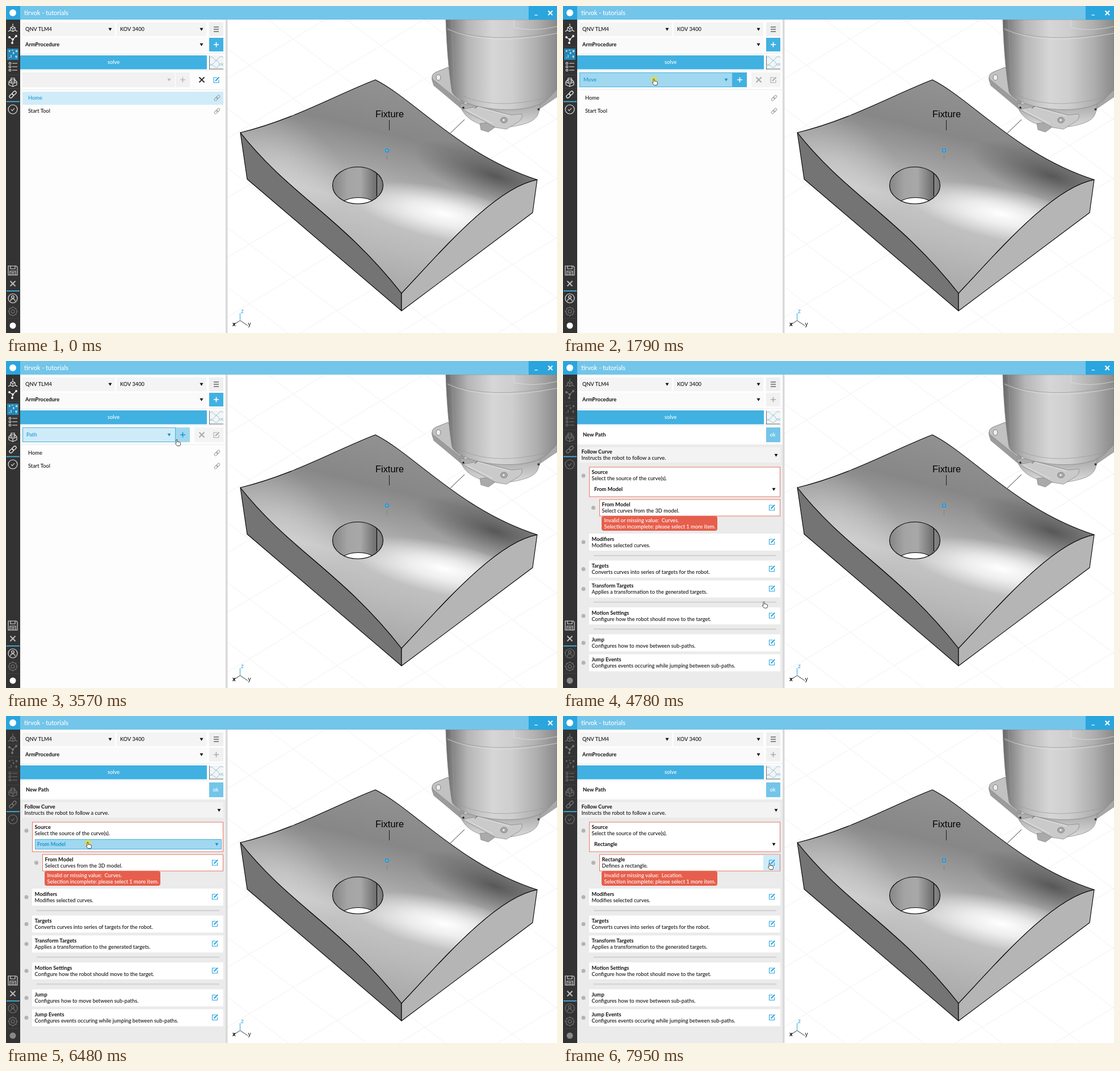
These frames come from a looping animation (971 by 576 pixels, 8 s). An HTML page:

```html
<!DOCTYPE html>
<html lang="en">
<head>
<meta charset="utf-8">
<title>Path tutorial</title>
<style>
  html, body { margin: 0; width: 100%; height: 100%; overflow: hidden; background: #fff; }
  svg { display: block; width: 100vw; height: 100vh; font: 500 9.3px Lato, "Open Sans", sans-serif; }
  .label { font-family: "Liberation Sans", Arial, sans-serif; }
</style>
</head>
<body>
<svg viewBox="0 0 971 576" preserveAspectRatio="none">
  <defs>
    <linearGradient id="top" gradientUnits="userSpaceOnUse" x1="690" y1="135" x2="600" y2="490">
      <stop offset="0" stop-color="#929292"/><stop offset=".25" stop-color="#878787"/>
      <stop offset=".42" stop-color="#a2a2a2"/><stop offset=".6" stop-color="#c6c6c6"/>
      <stop offset=".78" stop-color="#b9b9b9"/><stop offset="1" stop-color="#a6a6a6"/>
    </linearGradient>
    <radialGradient id="shine"><stop offset="0" stop-color="#fff"/><stop offset=".4" stop-color="#fff" stop-opacity=".7"/><stop offset="1" stop-color="#fff" stop-opacity="0"/></radialGradient>
    <radialGradient id="shade"><stop offset="0" stop-color="#444" stop-opacity=".75"/><stop offset="1" stop-color="#555" stop-opacity="0"/></radialGradient>
    <linearGradient id="bore">
      <stop offset="0" stop-color="#858585"/><stop offset=".3" stop-color="#a4a4a4"/><stop offset=".55" stop-color="#a8a8a8"/>
      <stop offset=".87" stop-color="#6c6c6c"/><stop offset=".88" stop-color="#858585"/><stop offset="1" stop-color="#777"/>
    </linearGradient>
    <linearGradient id="arm">
      <stop offset="0" stop-color="#666"/><stop offset=".07" stop-color="#888"/><stop offset=".2" stop-color="#b6b6b6"/>
      <stop offset=".42" stop-color="#d6d6d6"/><stop offset=".6" stop-color="#cecece"/><stop offset=".82" stop-color="#aeaeae"/><stop offset="1" stop-color="#8a8a8a"/>
    </linearGradient>
    <linearGradient id="cup" x2="0" y2="1"><stop offset="0" stop-color="#a8a8a8"/><stop offset="1" stop-color="#dcdcdc"/></linearGradient>
    <path id="surface" d="M413 223C505 201 585 155 651 130C720 165 800 262 936 306C860 320 760 440 697 506C592 372 500 333 413 223Z"/>
    <clipPath id="onSurface"><use href="#surface"/></clipPath>
    <clipPath id="view"><rect x="390" y="24" width="581" height="552"/></clipPath>
    <clipPath id="inBore"><ellipse cx="620" cy="316" rx="44.5" ry="32.5"/></clipPath>
    <filter id="shadow" x="-5%" y="-5%" width="110%" height="115%"><feDropShadow dx="1" dy="1" stdDeviation="1.5" flood-opacity=".35"/></filter>
  </defs>

  <g clip-path="url(#view)">
    <path id="grid" fill="none" stroke="#f1f1f1"/>
    <g stroke="#000" stroke-width="1.1" stroke-linejoin="round">
      <path fill="#747474" d="M413 223C500 333 592 372 697 506V537L425 305Z"/>
      <path fill="#b5b5b5" d="M697 506C760 440 860 320 936 306L928 364L697 537Z"/>
      <use href="#surface" fill="url(#top)" stroke="none"/>
      <g clip-path="url(#onSurface)" stroke="none">
        <ellipse rx="165" ry="46" fill="url(#shine)" transform="translate(772 366) rotate(12)"/>
        <ellipse rx="150" ry="46" fill="url(#shade)" transform="translate(862 300) rotate(18)"/>
        <ellipse rx="130" ry="75" fill="url(#shine)" opacity=".22" transform="translate(490 275) rotate(35)"/>
      </g>
      <use href="#surface" fill="none"/>
      <g clip-path="url(#inBore)">
        <rect x="575" y="283" width="90" height="66" fill="url(#bore)" stroke="none"/>
        <ellipse cx="621" cy="370" rx="44.5" ry="32.5" fill="#fff"/>
        <path d="M653.5 292V335"/>
      </g>
      <ellipse cx="620" cy="316" rx="44.5" ry="32.5" fill="none"/>
      <path fill="none" stroke-width=".8" d="M808 200L783 224M675.5 201V219"/>
      <path stroke="#777" stroke-width=".7" d="M671.5 263V271"/>
    </g>
    <text class="label" x="651" y="196" font-size="16.4">Fixture</text>
    <circle cx="671.5" cy="254.5" r="2.7" fill="#6bbbe2" stroke="#1c9ad6" stroke-width="1.8"/>

    <g stroke="#808080" stroke-width=".7">
      <path fill="#9c9c9c" d="M779 108L757 117Q749 121 751 131L754 140L804 182L812 158Z"/>
      <path fill="#c2c2c2" d="M779 108L757 117Q749 121 752 129L800 168L812 150Z"/>
      <ellipse cx="762" cy="126" rx="4" ry="5" fill="#eee" stroke="#555"/>
      <path fill="#a8a8a8" d="M971 148L932 170L936 184L971 160Z"/>
      <path fill="url(#cup)" d="M800 172C805 204 850 220 895 212S938 192 942 172Z"/>
      <path fill="url(#arm)" d="M775 24C777 80 781 120 786 151C800 184 925 196 955 163L971 147V24Z"/>
      <path fill="none" stroke="#e4e4e4" d="M778 41Q850 72 971 48M895 24V38Q930 46 971 36"/>
      <path fill="none" stroke="#999" d="M777 39Q850 69 971 45M786 149Q850 188 955 161M785 24L790 145M965 50V148"/>
      <path fill="#aaa" d="M835 207L853 205L861 214L850 222L837 218Z"/>
      <path fill="#cacaca" d="M804 182L832 177L890 192L909 190Q912 200 898 207L882 217L863 214Z"/>
      <path fill="none" stroke="#f0f0f0" d="M812 184L858 207M832 178L888 194"/>
      <ellipse cx="877.5" cy="201" rx="6" ry="5" fill="#aaa" stroke="#666"/>
      <circle cx="877" cy="201" r="2.4" fill="#eee"/>
      <path fill="none" stroke="#222" d="M830 177L826 181M803 179L808 181"/>
      <circle cx="806" cy="179" r="1.8" fill="#111"/><circle cx="938.5" cy="182" r="2" fill="#333"/>
    </g>

    <g class="label" font-size="10">
      <path fill="none" stroke="#222" stroke-width=".9" d="M402 561L412.500 554L426 563"/>
      <path stroke="#2aa5de" d="M412.500 554V541"/>
      <text x="414" y="541" fill="#2aa5de">z</text><text x="426.500" y="563.500">y</text><text x="399" y="564" font-weight="bold">x</text>
    </g>
  </g>

  <rect x="387" y="24" width="3.500" height="552" fill="#d9d9d9"/>
  <g id="panel"></g>
  <g id="sidebar"></g>
  <rect width="971" height="24" fill="#73c5e9"/>
  <rect width="25" height="24" fill="#2aa5de"/><circle cx="12" cy="12" r="6" fill="#fff"/>
  <rect x="921" width="50" height="24" fill="#2aa5de"/>
  <text x="32" y="16" font-size="11" fill="#fff">tirvok - tutorials</text>
  <path fill="none" stroke="#fff" stroke-width="1.200" d="M931.500 16H937"/>
  <path fill="none" stroke="#fff" stroke-width="2" d="M955.500 8.500L963 16M963 8.500L955.500 16"/>
  <g id="cursor">
    <circle id="click" cx=".5" cy="1.500" r="6" fill="#e4df2c" opacity=".7"/>
    <path id="arrow" fill="#fff" stroke="#222" stroke-width=".8" d="M0 0V9.500L2.200 7.500L3.800 10.500L5.200 9.800L3.800 7H6.800Z"/>
    <path id="hand" fill="#fff" stroke="#222" stroke-width=".8" stroke-linejoin="round" d="M-1 1Q0-1 1 1V4.500Q2 3.500 3 4.800Q4 4 5 5.200Q6.500 5 6.500 6.500V9L5.500 11.500H.5L-2.500 7.500Q-2.700 6-1 7Z"/>
  </g>
</svg>
<script>
const BLUE = '#41b1e1', INK = '#1c95d2', RED = '#ea7563';
const el = id => document.getElementById(id);

const rect = (x, y, w, h, fill, extra = '') =>
  `<rect x="${x}" y="${y}" width="${w}" height="${h}" fill="${fill}" ${extra}/>`;
const boxed = (x, y, w, h, fill, stroke) => rect(x + .5, y + .5, w - 1, h - 1, fill, `stroke="${stroke}"`);
const text = (x, y, s, fill = '#111', weight = 500) =>
  `<text x="${x}" y="${y + 3.4}" fill="${fill}" font-weight="${weight}">${s}</text>`;
const stroke = (d, color, width = 1, x = 0, y = 0) =>
  `<path d="${d}" transform="translate(${x} ${y})" fill="none" stroke="${color}" stroke-width="${width}"/>`;
const disc = (x, y, r, fill) => `<circle cx="${x}" cy="${y}" r="${r}" fill="${fill}"/>`;
const caret = (x, y, fill = '#111') => `<path fill="${fill}" d="M${x - 3} ${y - 2.3}h6l-3 5z"/>`;
const plus = (x, y, color) => stroke('M-4.500 0H4.500M0-4.500V4.500', color, 1.6, x, y);
const cross = (x, y, color) => stroke('M-4.500-4.500L4.500 4.500M4.500-4.500L-4.500 4.500', color, 2, x, y);
const edit = (x, y, color) =>
  stroke('M1-4H-5V5H4V0', color, 1.1, x, y) + stroke('M-2 2L4.500-4.500', color, 2.2, x, y);
const link = (x, y) => `<g transform="translate(${x} ${y}) rotate(-45)" fill="none" stroke="#999">
  <rect x="-6" y="-2" width="7" height="4" rx="2"/><rect x="-1" y="-2" width="7" height="4" rx="2"/></g>`;

function header(adding) {
  return rect(25, 24, 362, 552, '#fdfdfd')
    + rect(29, 29, 163, 24, '#f4f4f4') + text(34, 41, 'QNV TLM4') + caret(183.5, 41)
    + rect(195, 29, 158, 24, '#f4f4f4') + text(201, 41, 'KOV 3400') + caret(344.5, 41)
    + rect(358, 29, 25, 24, '#efefef') + stroke('M-4.500-4H4.500M-4.500 0H4.500M-4.500 4H4.500', '#222', 1, 370.5, 41)
    + rect(29, 56, 325, 24, '#fafafa') + text(34, 68, 'ArmProcedure', '#111', 700) + caret(344.5, 68)
    + rect(358, 56, 25, 24, adding ? '#f1f1f1' : BLUE) + plus(370.5, 68, adding ? '#aaa' : '#fff')
    + rect(25, 83, 362, 1, '#eee') + rect(25, 87, 329, 24.5, BLUE) + text(179, 99, 'solve', '#fff')
    + rect(358, 87, 25, 24.5, '#f4f4f4') + stroke('M.500 0V24M0 23.500H25', '#444', .8, 358, 87.5)
    + stroke('M0 5q4-6 8 0t8 0t9-2M0 13q4 6 9-1t8 1t8 0M0 19q5-5 9 0t8-2t8 1', '#7fc4e4', .9, 358, 87.5)
    + rect(25, 113, 362, 1, '#eee') + rect(25, 147, 362, 1, '#ececec');
}

// Pop-up list whose selected row lies over the combo box it belongs to.
function menu(x, y, w, items, selected, top, cursorY) {
  const center = i => top + i * 18.6 + (i >= selected) * 1.2 + (i > selected) * 1.3;
  const height = items.length * 18.6 + 7;
  return rect(x + 1, y + 1, w - 2, height, '#fff', 'stroke="#dadada" stroke-width="2" filter="url(#shadow)"')
    + items.map((item, i) => {
      const cy = center(i), here = i === selected;
      const hovered = Math.abs(cursorY + 3 - cy) < 9.3;
      return (here ? boxed(x + 3, cy - 10.5, w - 6, 21, '#73c5e9', '#2599d3')
        : hovered ? rect(x + 4, cy - 9.3, w - 8, 18.6, '#f4f4f4') : '')
        + text(x + (here ? 12 : 11), cy, item, here ? '#fff' : INK);
    }).join('');
}

function listPanel(t, cur) {
  const homeSelected = t < 1120, open = t >= 1860 && t < 2780;
  const picked = t >= 2780, onPlus = t > 3500 && cur.x > 299 && cur.x < 324 && cur.y < 143;
  const hover = cur.y < 143 && cur.x > 29 && cur.x < 299;
  let s = header(false);
  if (homeSelected) {
    s += rect(29, 117, 269, 26, '#f1f1f1') + caret(287.5, 130, '#bbb') + rect(299, 117, 25, 26, '#f1f1f1')
      + plus(311.5, 130, '#bbb') + cross(345, 130, '#333') + edit(371, 130, '#2aa5de');
  } else {
    s += (picked ? boxed(29, 117, 270, 26, '#cfebf8', BLUE)
      : hover ? boxed(29, 117, 270, 26, '#a0d8f0', BLUE) : rect(29, 117, 269, 26, '#f6f6f6'))
      + text(36, 130, picked ? 'Path' : 'Move', picked || hover ? INK : '#111') + caret(287.5, 130, picked || hover ? INK : '#111')
      + rect(299, 117, 25, 26, onPlus ? '#a0d8f0' : BLUE) + plus(311.5, 130, onPlus ? INK : '#fff')
      + rect(332, 117, 51, 26, '#f4f4f4') + cross(345, 130, '#aaa') + edit(371, 130, '#aaa');
  }
  s += (homeSelected ? rect(29, 151, 354, 23, '#cfecf8') : '')
    + text(39, 162, 'Home', homeSelected ? INK : '#111') + link(372, 162)
    + text(39, 185, 'Start Tool') + link(372, 185);
  if (open) s += menu(29, 62, 269, ['Call', 'Custom Action', 'Group', 'Move', 'Path', 'Set Signal', 'Wait'], 3, 73.5, cur.y);
  return s;
}

function card(x, y, h, title, note, border) {
  return (border ? boxed(x, y, 383 - x, h, '#fff', RED) : rect(x, y, 383 - x, h, '#fff'))
    + text(x + 4.5, y + 9.5, title, '#111', 700) + text(x + 4.5, y + 20.5, note);
}

function formPanel(t, cur) {
  const rectangle = t >= 7460, open = t >= 6600 && !rectangle;
  const onSource = !rectangle && cur.y > 214 && cur.y < 236;
  const onEdit = cur.x > 352 && cur.y > 243 && cur.y < 273;
  const source = rectangle ? 'Rectangle' : 'From Model';
  let s = header(true) + rect(29, 117, 325, 26, '#fff') + text(35, 130, 'New Path', '#111', 700)
    + rect(358, 117, 25, 26, '#73c5e9') + text(364.5, 130, 'ok', '#fff')
    + rect(25, 148, 362, 428, '#ebebeb') + rect(29, 152, 354, 27, '#f3f3f3')
    + text(32.5, 160, 'Follow Curve', '#111', 700) + text(32.5, 171, 'Instructs the robot to follow a curve.') + caret(375.5, 166)
    + card(46, 186.5, 53, 'Source', 'Select the source of the curve(s).', true)
    + (onSource ? boxed(51, 217, 329, 18, '#a0d8f0', BLUE) : '')
    + text(55, 226, source, onSource ? INK : '#111', 700) + caret(371.5, 226, onSource ? INK : '#111') + disc(36, 202, 3.5, '#b3b3b3')
    + card(64, 243.5, 30, source, rectangle ? 'Defines a rectangle.' : 'Select curves from the 3D model.', true)
    + (onEdit ? rect(353, 244.5, 29, 28, '#cfebf8') : '') + edit(368.5, 258, '#2aa5de') + disc(53.5, 258.5, 3.5, '#b3b3b3');
  const cards = [
    [304, 'Modifiers', 'Modifies selected curves.'],
    [351.5, 'Targets', 'Converts curves into series of targets for the robot.'],
    [386.5, 'Transform Targets', 'Applies a transformation to the generated targets.'],
    [434, 'Motion Settings', 'Configure how the robot should move to the target.'],
    [481.5, 'Jump', 'Configures how to move between sub-paths.'],
    [516.5, 'Jump Events', 'Configures events occuring while jumping between sub-paths.']];
  for (const [y, title, note] of cards)
    s += card(46, y, 30, title, note) + edit(368.5, y + 14, '#2aa5de') + disc(36, y + 15, 3.5, '#b3b3b3');
  for (const y of [341.5, 423.5, 471]) s += rect(54, y, 322, 2.5, '#d5d5d5');
  s += rect(68, 273, 204, 26, '#e65f4c', 'rx="4"')
    + text(72.5, 281, `Invalid or missing value:&#160; ${rectangle ? 'Location' : 'Curves'}.`, '#fff')
    + text(72.5, 292, 'Selection incomplete: please select 1 more item.', '#fff');
  if (open) s += menu(51, 177, 329, ['Circle', 'Ellipse', 'From Model', 'Polygon', 'Rectangle'], 2, 187.5, cur.y);
  return s;
}

function sidebar(dim) {
  const on = dim ? '#777' : '#eee';
  const icon = (y, d, color = on) => stroke(d, color, 1.1, 12, y);
  const ring = (x, y, r, color = on) => `<circle cx="${x}" cy="${y}" r="${r}" fill="none" stroke="${color}" stroke-width="1.1"/>`;
  let s = rect(0, 24, 25, 552, '#333');
  for (const y of [49, 71, 97, 121, 145, 550]) s += rect(2, y, 21, .7, '#4a4a4a');
  if (!dim) s += rect(2, 75, 20, 20, '#2387b8');
  for (const y of [101, 107, 113]) s += ring(7, y, 1.8);
  return s + rect(1, 167.5, 23, 1.8, BLUE) + rect(1, 501, 23, 1.8, BLUE)
    + icon(39, 'M0-8V-3L4-1V4L0 6L-4 4V-1L0-3M-4-1L0 1L4-1M0 1V6M-4 3L-8 6M4 3L8 6')
    + icon(59, 'M-6-4L0 0L6-6M0 0L-1 6') + disc(6, 55, 2, on) + disc(18, 53, 2, on) + disc(11, 65, 2, on) + disc(12, 59, 2, on)
    + icon(85, 'M-7 6h2M-3 6V1M-7-6h3M-6-7v3M0-2h3M1-4v4M5-7l3 3M8-7l-3 3M4 4h4M6 2v5M-2-7h3')
    + icon(107, 'M-1-6H8M-1 0H8M-1 6H8')
    + icon(134, 'M-7 0L0 3L7 0V5L0 8L-7 5ZM0 3V8M-7-1L-4-3M7-1L4-3M-3-7H3V0H-3ZM-5-4H5')
    + `<g transform="translate(12 156) rotate(-45)" fill="none" stroke="${on}" stroke-width="1.3"><rect x="-7.5" y="-2.5" width="8" height="5" rx="2.5"/><rect x="-.5" y="-2.5" width="8" height="5" rx="2.5"/></g>`
    + ring(12, 182, 8) + icon(182, 'M-3 0L-1 2.500L3-2')
    + icon(466, 'M-8-8H6L8-6V8H-8ZM-4-8V-3H4V-8M-5 8V1H5V8M-3 3.500H3M-3 6H3', '#ddd') + cross(12, 489, '#bbb')
    + ring(12, 515, 8) + ring(12, 512.5, 2.3) + icon(515, 'M-4 5Q-4 1 0 1T4 5')
    + ring(12, 538, 7, '#777') + ring(12, 538, 3, '#777') + icon(538, 'M0-9V-7M0 9V7M-9 0H-7M9 0H7M-6-6L-5-5M6 6L5 5M-6 6L-5 5M6-6L5-5', '#777')
    + disc(12, 563, 5.5, dim ? '#888' : '#fff');
}

// Pointer positions: time, x, y.
const route = [
  [70, 966, 396], [820, 259, 230], [1180, 259, 230], [1510, 160, 128], [1880, 160, 128], [2440, 66, 146],
  [2920, 66, 146], [3240, 295, 138], [3430, 295, 138], [3560, 301, 138], [3800, 302, 138], [3990, 391, 290],
  [4180, 370, 432], [4680, 370, 432], [5300, 144, 314], [5400, 144, 314], [5460, 144, 268], [5560, 144, 268],
  [6200, 144, 222], [6640, 144, 222], [7130, 110, 263], [7460, 110, 263], [7900, 364, 259], [8000, 364, 259]];
const clicks = [[1060, 1180], [1790, 1880], [2640, 2780], [3640, 3760], [6450, 6600], [7330, 7460]];

function pointer(t) {
  const i = Math.max(1, route.findIndex(p => p[0] > t));
  const [t0, x0, y0] = route[i - 1], [t1, x1, y1] = route[i];
  const k = Math.min(1, Math.max(0, (t - t0) / (t1 - t0))), e = k * k * (3 - 2 * k);
  return { x: x0 + (x1 - x0) * e, y: y0 + (y1 - y0) * e };
}

const shown = {};
function put(id, html) {
  if (shown[id] !== html) el(id).innerHTML = shown[id] = html;
}

function draw(t) {
  const cur = pointer(t), form = t >= 4710, menuOpen = t >= 1860 && t < 2780;
  put('panel', form ? formPanel(t, cur) : listPanel(t, cur));
  put('sidebar', sidebar(form));
  const hand = form || menuOpen || (cur.y < 143 && cur.x < 324);
  el('cursor').setAttribute('transform', `translate(${cur.x} ${cur.y})`);
  el('cursor').style.display = t < 70 ? 'none' : '';
  el('hand').style.display = hand ? '' : 'none';
  el('arrow').style.display = hand ? 'none' : '';
  el('click').style.display = clicks.some(([a, b]) => t >= a && t < b) ? '' : 'none';
}

let lines = '';
for (let i = -6; i < 14; i++) lines += `M390 ${i * 105 + 23}l581 -350M390 ${i * 105 - 30}l581 440`;
el('grid').setAttribute('d', lines);

const start = performance.now();
function frame() {
  draw((performance.now() - start) % 8000);
  requestAnimationFrame(frame);
}
frame();
</script>
</body>
</html>
```
